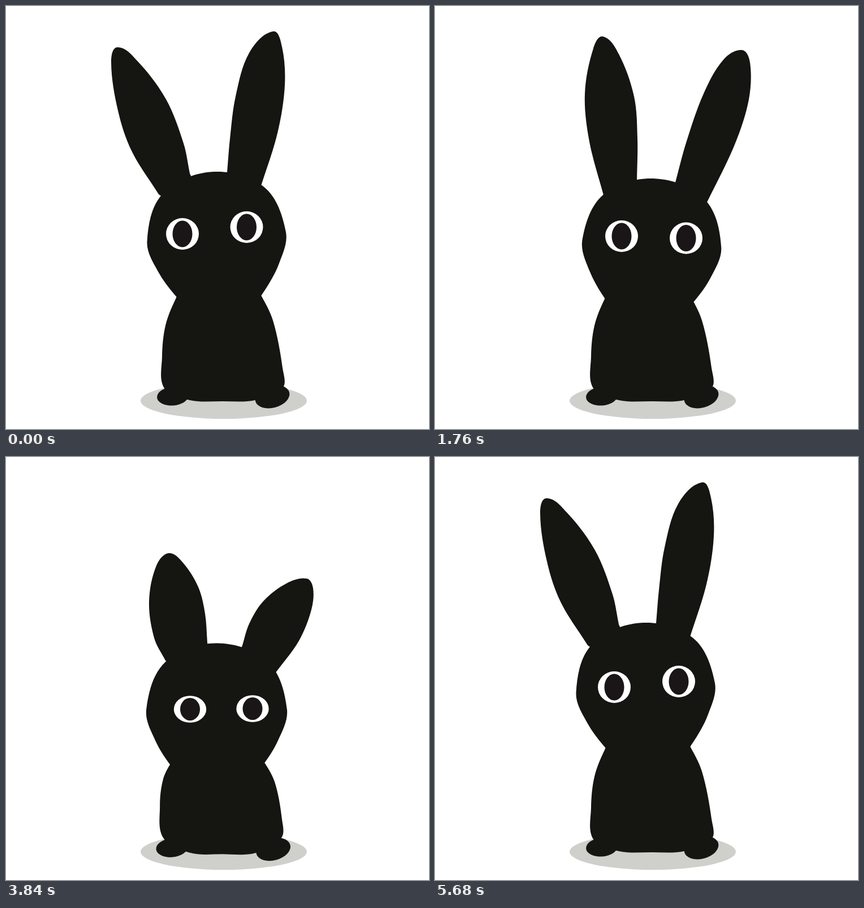
Write an HTML page that moves like this. It is 748x748 px and loops after 5760 ms.

```html
<!DOCTYPE html>
<html lang="en">
<head>
<meta charset="utf-8">
<title>Black rabbit</title>
<style>
  html, body { margin: 0; height: 100%; overflow: hidden; background: #fff; }
  svg { display: block; width: 100vw; height: 100vh; }
  .fur { fill: #151511; }
  .pupil { fill: #1a1618; }
  .white { fill: #fff; }
</style>
</head>
<body>
<svg viewBox="0 0 748 748">
  <ellipse cx="385" cy="698" rx="147" ry="32" fill="#cfcfcc"/>
  <g class="fur">
    <path id="earL"/><path id="earR"/><path id="body"/><path id="head"/>
    <ellipse id="footL" rx="28" ry="16.5"/>
    <ellipse id="footR" rx="31" ry="19.5"/>
  </g>
  <g id="eyeL"></g>
  <g id="eyeR"></g>
</svg>
<script>
const LOOP = 5760, STEP = 80;
const $ = id => document.getElementById(id);
const points = text => text.split(' ').map(p => p.split(',').map(Number));
const lerp = (a, b, u) => Array.isArray(a) ? a.map((v, i) => lerp(v, b[i], u)) : a + (b - a) * u;

const smoothstep = u => u * u * (3 - 2 * u);
const linear = u => u;
const easeIn = u => u * u;
const easeOut = u => 1 - (1 - u) * (1 - u);

// Ear outlines run from the left base over the tip (fifth point) to the right base.
const calm = {
  left: points('270,333 222,256 198,185 186,100 197,73 233,98 283,165 314,243 325,296'),
  right: points('391,294 396,235 406,160 430,83 472,45 488,72 493,140 480,225 450,321')
};
const tilted = {
  left: points('311,328 301,215 315,130 347,70 368,45 387,78 396,175 384,240 373,305'),
  right: points('440,316 459,266 502,192 575,119 608,107 626,130 604,190 562,249 489,352')
};
const upright = {
  left: points('299,338 273,240 265,155 280,75 297,54 325,85 352,160 358,235 357,308'),
  right: points('425,312 444,242 475,155 510,95 543,78 557,100 555,165 530,245 480,349')
};
const short = {
  left: points('282,360 262,320 253,255 266,192 288,170 313,187 340,230 352,277 356,328'),
  right: points('418,333 430,295 455,255 497,223 532,215 543,232 540,270 518,325 477,381')
};
const wide = {
  left: points('275,337 228,256 200,180 192,95 211,60 241,83 278,142 311,217 324,299'),
  right: points('389,295 388,225 400,145 440,70 473,48 488,68 494,135 482,230 458,322')
};
const tuft = points('310,357 325,335 342,319 372,303 391,298 400,303 405,322 407,340 407,350');

// Turns and stretches an ear about its base so that its tip lands on the given place.
function swing(ear, tip, width = 1, drop = 0) {
  const [a, z] = [ear[0], ear[8]];
  const bx = (a[0] + z[0]) / 2, by = (a[1] + z[1]) / 2;
  const ax = ear[4][0] - bx, ay = ear[4][1] - by;
  const vx = tip[0] - bx, vy = tip[1] - by - drop;
  const len = Math.hypot(ax, ay), newLen = Math.hypot(vx, vy);
  return ear.map(([x, y]) => {
    const along = ((x - bx) * ax + (y - by) * ay) / len / len;
    const across = ((y - by) * ax - (x - bx) * ay) / len * width / newLen;
    return [bx + along * vx - across * vy, by + drop + along * vy + across * vx];
  });
}

const poses = [];
function pose(time, changes) {
  poses.push({ ...poses[poses.length - 1], ease: smoothstep, ...changes, time });
}

// head: x, y, tilt in degrees; eyes: left x, y, right x, y
pose(0, { ...calm, head: [372, 405, -4], eyes: [312, 403, 425.5, 391], open: 1, squash: 0, lift: 0 });
pose(640, { ...tilted, head: [391, 414, 4], eyes: [336, 406, 450.5, 412.5] });
pose(1120, {});
pose(1760, { ...upright, head: [383.5, 417, 3], eyes: [330, 407, 444, 410.5] });
pose(2080, {
  left: swing(upright.left, [300, 58]), right: swing(upright.right, [559, 88]),
  head: [378, 419, 2], eyes: [326, 411, 440, 415], squash: .1
});
pose(2560, {
  left: swing(short.left, [335, 222]), right: swing(short.right, [556, 258]),
  head: [371, 442, 3], eyes: [323, 455, 428, 467], open: .3, squash: .6, ease: easeIn
});
pose(2640, {
  left: swing(short.left, [362, 252]), right: swing(short.right, [606, 330]),
  head: [373, 448, 3], eyes: [326, 468, 427, 484], open: .15, squash: .75, ease: linear
});
pose(2800, {
  left: lerp(swing(short.left, [375, 275]), tuft, .7), right: swing(short.right, [540, 430], .7, 15),
  head: [375, 456, 3], eyes: [328, 478, 426, 499], open: 0, squash: .9, ease: linear
});
pose(2960, {
  left: tuft, right: swing(short.right, [425, 455], .5, 28),
  head: [375, 460, 3], eyes: [329, 483, 426, 507], squash: 1, ease: easeOut
});
pose(3200, { head: [375, 462, 3], eyes: [329, 485, 426, 508], squash: 1.1 });
pose(3440, {
  left: swing(short.left, [335, 235]), right: swing(short.right, [598, 320]),
  head: [374, 452, 2], eyes: [328, 464, 431, 474], open: .3, squash: .8, ease: easeIn
});
pose(3840, { ...short, head: [372.5, 443, 0], eyes: [325.5, 446, 436, 445], open: .85, squash: .55, ease: easeOut });
pose(4320, {
  left: swing(wide.left, [173, 92]), right: swing(wide.right, [446, 80]),
  head: [369.5, 411, -4], eyes: [323, 412, 438, 404], open: 1, squash: 0, lift: 5
});
pose(4400, {});
pose(4480, { eyes: [323, 414, 438, 406] });
pose(4640, {});
pose(4960, { ...wide, head: [369.5, 407, -3.5], eyes: [324.5, 402, 439, 394] });
pose(5200, {});
pose(5680, { ...calm, head: [372, 405, -4], eyes: [317, 407, 431, 397], lift: 0 });
pose(LOOP, { eyes: poses[0].eyes });

const skull = (() => {
  const half = points('45,138 75,108 107,58 123,3 90,-79');
  return [...half, [0, -112], ...half.map(([x, y]) => [-x, y]).reverse()];
})();
const restBody = points('318,490 300,518 282,565 276,620 280,676 325,697 383,699 441,697 489,676 489,640 472,556 449,508 435,488');
const lowBody = points('308,535 290,552 275,572 269,615 277,672 325,702 383,705 441,703 485,672 487,640 477,588 457,556 440,535');

function curve(pts, closed) {
  const n = pts.length;
  const at = i => pts[closed ? (i + n) % n : Math.max(0, Math.min(n - 1, i))];
  const direction = i => {
    const [px, py] = at(i - 1), [qx, qy] = at(i + 1);
    const len = Math.hypot(qx - px, qy - py) || 1;
    return [(qx - px) / len, (qy - py) / len];
  };
  let d = '';
  for (let i = 0; i < (closed ? n : n - 1); i++) {
    const [ax, ay] = at(i), [bx, by] = at(i + 1);
    const [ux, uy] = direction(i), [vx, vy] = direction(i + 1);
    const k = Math.hypot(bx - ax, by - ay) / 3;
    d += `C${ax + ux * k},${ay + uy * k} ${bx - vx * k},${by - vy * k} ${bx},${by}`;
  }
  return d;
}
const closedPath = pts => `M${pts[0]}${curve(pts, true)}Z`;
const earPath = (pts, [x, y]) => `M${x},${y}L${pts[0]}${curve(pts, false)}Z`;

for (const id of ['eyeL', 'eyeR']) {
  $(id).innerHTML = '<ellipse class="white"/><ellipse class="pupil"/>' +
    '<path class="white" d="M-27,-12C-22,10 8,30 27,1C10,13 -14,7 -24,-13Q-26,-15 -27,-12Z"/>';
}

function drawEye(group, x, y, open) {
  const [white, pupil, lid] = group.children;
  const shut = open < .25;
  group.setAttribute('transform', `translate(${x} ${y})`);
  white.setAttribute('rx', 27 + 2 * open);
  white.setAttribute('ry', 28 * open);
  pupil.setAttribute('rx', 17.5);
  pupil.setAttribute('ry', 23.5 * open);
  white.style.display = pupil.style.display = shut ? 'none' : '';
  lid.style.display = shut ? '' : 'none';
}

function placeFoot(foot, x, y, turn) {
  foot.setAttribute('transform', `translate(${x} ${y}) rotate(${turn})`);
}

function draw(time) {
  const next = poses.findIndex(p => p.time > time);
  const a = poses[next - 1], b = poses[next];
  const u = b.ease((time - a.time) / (b.time - a.time));
  const mix = key => lerp(a[key], b[key], u);
  const head = mix('head'), eyes = mix('eyes'), open = mix('open');
  const squash = mix('squash'), lift = mix('lift');

  const turn = head[2] * Math.PI / 180, cos = Math.cos(turn), sin = Math.sin(turn);
  const skullNow = skull.map(([x, y]) => {
    const sx = x * (1 + .02 * squash), sy = y * (1 + .03 * squash);
    return [head[0] + sx * cos - sy * sin, head[1] + sx * sin + sy * cos];
  });
  $('head').setAttribute('d', closedPath(skullNow));
  $('earL').setAttribute('d', earPath(mix('left'), head));
  $('earR').setAttribute('d', earPath(mix('right'), head));
  $('body').setAttribute('d', closedPath(lerp(restBody, lowBody, squash)));
  placeFoot($('footL'), 295 - 3 * squash, 690 + 2 * squash - lift * .3, -5);
  placeFoot($('footR'), 471 + 3 * squash + lift * .3, 691 + 5 * squash - lift, -15 + lift * 2);
  drawEye($('eyeL'), eyes[0], eyes[1], open);
  drawEye($('eyeR'), eyes[2], eyes[3], open);
}

const start = performance.now();
function tick() {
  const elapsed = Math.max(0, performance.now() - start) % LOOP;
  draw(Math.floor(elapsed / STEP) * STEP);
  requestAnimationFrame(tick);
}
tick();
</script>
</body>
</html>
```
